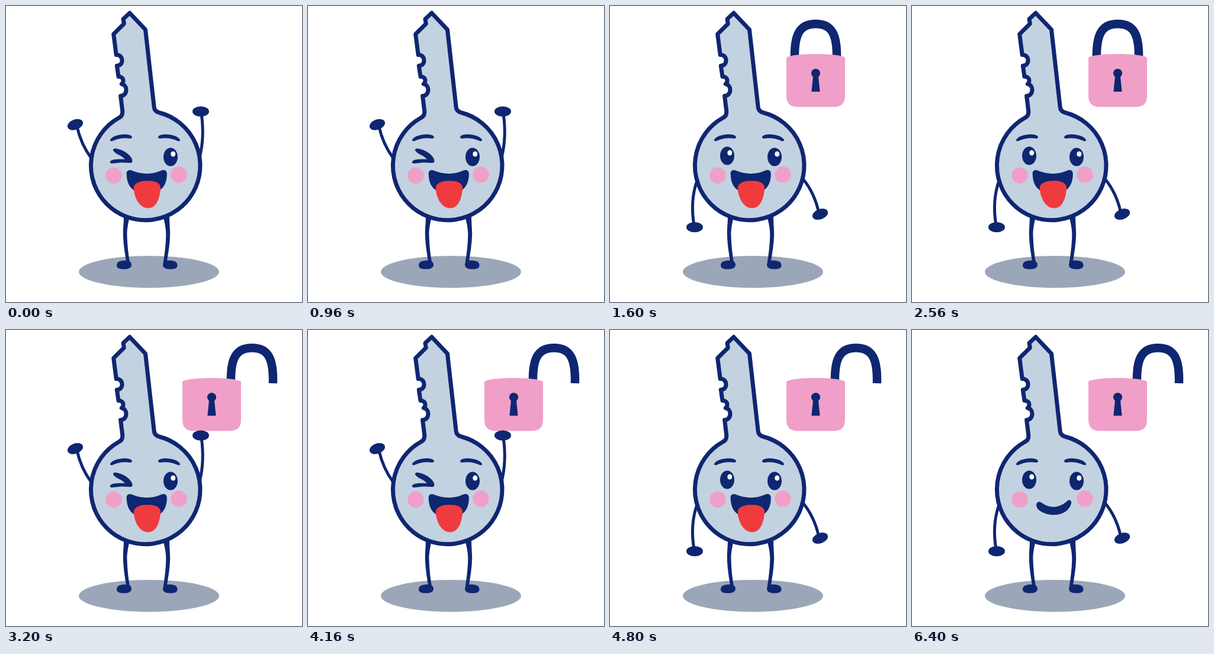
Write an HTML page with a canvas that moves like this. It is 500 px wide and 500 px high and loops after 7000 ms.

```html
<!DOCTYPE html>
<html lang="en">
<head>
<meta charset="utf-8">
<title>Key and padlock</title>
<style>
html, body { margin: 0; width: 100%; height: 100%; overflow: hidden; background: #fff; }
canvas { display: block; width: 100vw; height: 100vh; object-fit: contain; }
</style>
</head>
<body>
<canvas id="stage" width="500" height="500"></canvas>
<script>
const ctx = document.getElementById('stage').getContext('2d');
const NAVY = '#0f2671', STEEL = '#c3d2e1', PINK = '#f0a0c8', RED = '#ef3b3e', SHADOW = '#9ba7b8';
const LOOP = 7000, BEAT = 1600;

const fill = (d, color = NAVY) => {
  ctx.fillStyle = color;
  ctx.fill(new Path2D(d));
};

const stroke = (d, width, cap = 'round') => {
  ctx.strokeStyle = NAVY;
  ctx.lineWidth = width;
  ctx.lineCap = cap;
  ctx.lineJoin = 'round';
  ctx.stroke(new Path2D(d));
};

const oval = (x, y, rx, ry = rx, color = NAVY, tilt = 0) => {
  ctx.fillStyle = color;
  ctx.beginPath();
  ctx.ellipse(x, y, rx, ry, tilt, 0, Math.PI * 2);
  ctx.fill();
};

const KEY = `M209 11.8 L198 22 L199.3 30 L181.7 47.5 L186.2 82.5
  C192 82 196 86.5 196 92 C196 97.5 192.5 100.8 187.3 101 L190 119.3
  C195 119 198.3 122.5 198 126.5 C197.8 129 196.8 130.5 195.3 131.8
  C200 132.5 203 136.5 203 141.5 C203 147.5 199.5 151.5 193.6 152
  L196.8 178 C197 184 195 187 190.5 189
  A92.3 92.3 0 1 0 258.5 180 C253.5 178.5 250.8 176 250.2 171
  L235.5 39.8 Z`;

function legs() {
  fill('M199 354 L209 354 C207 366 204 376 204.5 388 C205 404 206.5 419 209 433 L203.5 433 C200 415 198 398 197.8 385 C197.8 374 199 366 199 354 Z');
  fill('M265 354 L276 354 C276 366 277 374 277.2 385 C277 400 274.5 416 271.5 433 L265.8 433 C268 418 270 404 270.3 388 C270.5 376 268 366 265 354 Z');
  fill('M187 438 C187 432 193 430 200 430 C207 429 212 432 212 437 C212 443 206 444.5 199 444.5 C192 444.5 187 443 187 438 Z');
  fill('M289.5 438 C289.5 432 284 430 277 430 C270 429 265 432 265 437 C265 443 271 444.5 278 444.5 C285 444.5 289.5 443 289.5 438 Z');
}

function arms(raised) {
  if (raised) {
    stroke('M144 257 C133 242 124 222 120 204', 5);
    oval(117, 200.3, 13.6, 8.6, NAVY, -0.36);
    stroke('M327 256 C333 232 333.5 206 330 182', 5);
    oval(329, 178.2, 14, 8.6);
    stroke('M146 296 L149 305', 4);
    stroke('M326 288 L325 297', 4);
  } else {
    stroke('M147 295 C139 318 137.5 344 142 370', 5);
    oval(143, 373.7, 14, 8.6);
    stroke('M326 292 C339 308 348 328 352.5 348', 5);
    oval(355, 351.7, 13.6, 8.6, NAVY, -0.36);
  }
}

function eye(x, y) {
  oval(x, y, 12, 15.5);
  oval(x + 4.3, y - 5, 4, 4.6, '#fff');
}

function brow() {
  fill('M176 226 C180 217 206 213.5 212.5 220 C214 223.5 211 224.5 206 223.5 C196 222.5 188 224.5 180 228 C177.5 228.8 175.5 228 176 226 Z');
}

function face(wink, open) {
  brow();
  ctx.save();
  ctx.translate(470, 0);
  ctx.scale(-1, 1);
  brow();
  ctx.restore();

  if (wink) {
    fill('M181 242.5 C182 240.5 185 240.5 189 241.5 C201 244.5 211 252 213.3 260 C214 264.5 212 265.5 208 265 C198 264 190 264.5 180 266 C176.5 266.5 174.8 264 176.5 262 C180 258.5 190 258.5 201 259 C195 252 188 251.5 183.5 247 C181.5 245 180.5 243.8 181 242.5 Z');
  } else {
    eye(198, 253);
  }
  eye(278, 255);

  oval(182, 286.3, 13.8, 13.8, PINK);
  oval(292, 285, 13.8, 13.8, PINK);

  if (open) {
    fill('M203.7 284 C203 278 208 275.8 214 278.5 C230 284.8 247 284.8 262 278 C268 275.5 272.3 278 271.8 285 C271.5 298 267 306 260 311 L217 312 C208 306 204 297 203.7 284 Z');
    fill('M215.8 308 C215.5 300 225 295.3 239 295.3 C254 295.3 261.5 300 261 308 C260.5 320 256 341.5 240 341.5 C224 341.5 216.2 321 215.8 308 Z', RED);
  } else {
    fill('M210 295.5 C210.5 290 215.5 288.8 219 291.8 C232 302 249 301 262 289 C266 285.5 269.8 288 269 293 C266 305 254 312.3 240 312.3 C224 312.3 210 304.5 210 295.5 Z');
  }
}

function padlock(unlocked) {
  ctx.save();
  ctx.translate(unlocked ? 68 : 0, 0);
  stroke('M312 90 C311 50 319 30.3 347.5 30.3 C376 30.3 384 50 383 90', 14.5, 'butt');
  ctx.restore();
  fill('M298 87 C310 79 385 79 397 87 L397 152 Q397 170.5 378 170.5 L317 170.5 Q298 170.5 298 152 Z', PINK);
  oval(347.5, 113.6, 7.6);
  fill('M343.2 117 L351.8 117 L354.6 144.8 L340.4 144.8 Z');
}

function draw(step) {
  const cheering = step === 0 || step === 2;
  ctx.fillStyle = '#fff';
  ctx.fillRect(0, 0, 500, 500);
  oval(241.5, 449, 118.5, 27, SHADOW);
  if (step > 0) padlock(step > 1);
  legs();
  arms(cheering);
  fill(KEY, STEEL);
  stroke(KEY, 7);
  face(cheering, step < 4);
}

function tick() {
  draw(Math.floor((performance.now() % LOOP) / BEAT));
  requestAnimationFrame(tick);
}
tick();
</script>
</body>
</html>
```
